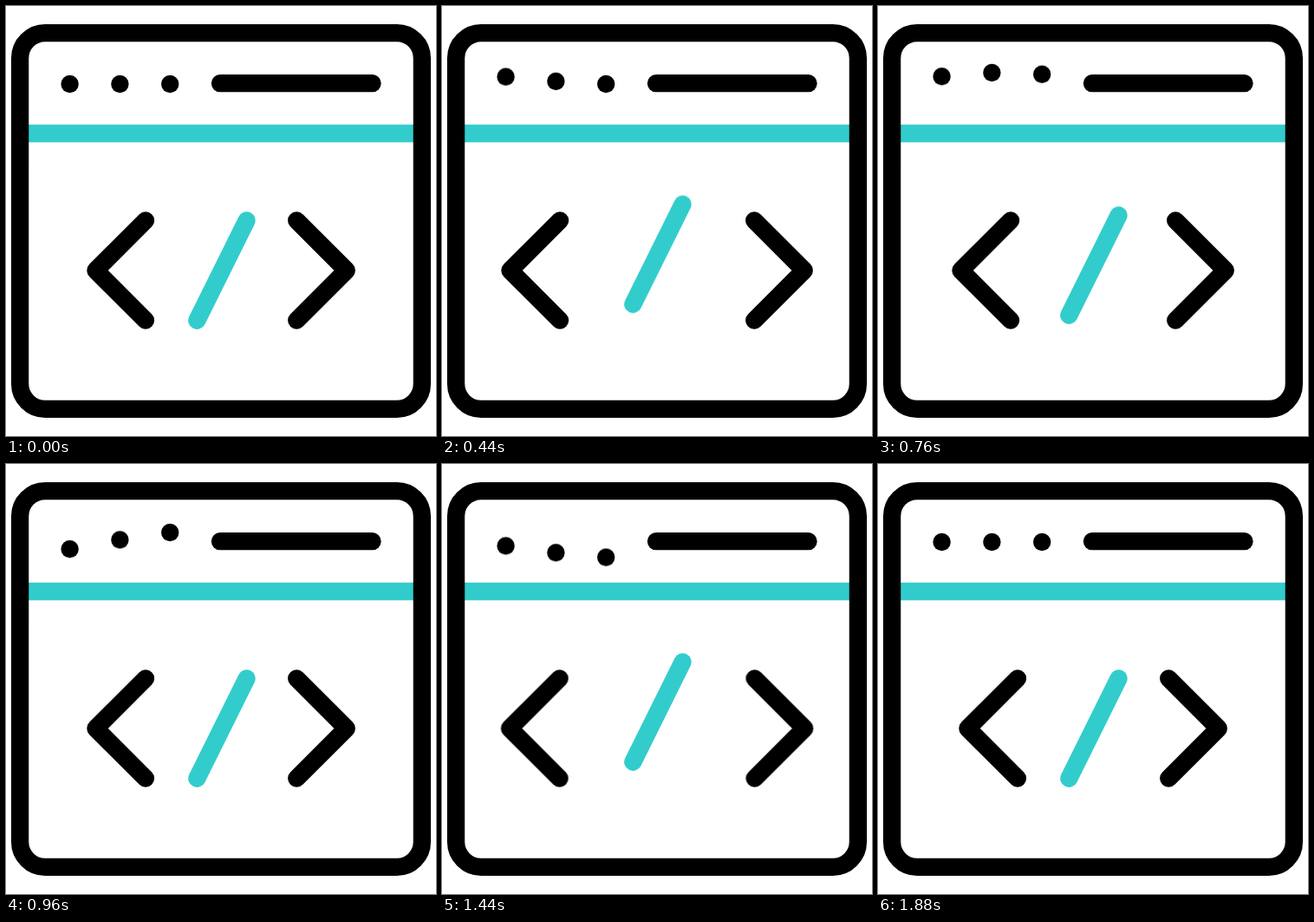
An HTML page without scripts that plays this animation: 496x496 px, repeating every 1920 ms.

```html
<!DOCTYPE html>
<html lang="en">
<head>
<meta charset="utf-8">
<title>Code window</title>
<style>
  html, body { margin: 0; width: 100%; height: 100%; overflow: hidden; background: #fff; }
  svg { display: block; width: 100%; height: 100%; }
  .line { fill: none; stroke: #000; stroke-width: 20.3; stroke-linecap: round; stroke-linejoin: round; }
  .teal { stroke: #3cc; }
  .flat { stroke-linecap: butt; }

  .push { animation: push 1.92s ease-in-out infinite; }
  .left { --x: -25.5px; }
  .right { --x: 25.5px; }
  .slash { --y: -19.1px; }
  @keyframes push {
    0%, 4.06%, 47.76%, 51.15%, 94.79%, 100% { transform: translate(0, 0); }
    25.1%, 26.82%, 72.14%, 74.01% { transform: translate(var(--x, 0px), var(--y, 0px)); }
  }

  .dot { animation: bob 1.92s linear infinite; }
  .second { animation-delay: .12s; }
  .third { animation-delay: .24s; }
  @keyframes bob {
    0% { transform: translateY(0); }
    9.9% { transform: translateY(0); animation-timing-function: cubic-bezier(.3, 0, .6, 1); }
    33.33% { transform: translateY(-13.1px); animation-timing-function: cubic-bezier(.333, 0, .667, 1); }
    60.16% { transform: translateY(18px); animation-timing-function: cubic-bezier(.39, 0, .5, 1); }
    84.38%, 100% { transform: translateY(0); }
  }
</style>
</head>
<body>
<svg viewBox="0 0 496 496">
  <path class="line teal flat" d="M20 147H476"/>
  <rect class="line" x="16.1" y="31.2" width="463.8" height="433.6" rx="29"/>
  <circle class="dot" cx="73.6" cy="90" r="10.2"/>
  <circle class="dot second" cx="131.4" cy="90" r="10.2"/>
  <circle class="dot third" cx="189.2" cy="90" r="10.2"/>
  <path class="line" d="M247 89.2H422.5"/>
  <path class="line push left" d="M161 247.4L103.4 305L161 362.6"/>
  <path class="line teal push slash" d="M277.5 247.4L220.3 362.7"/>
  <path class="line push right" d="M335.2 247.4L392.8 305L335.2 362.6"/>
</svg>
</body>
</html>
```
